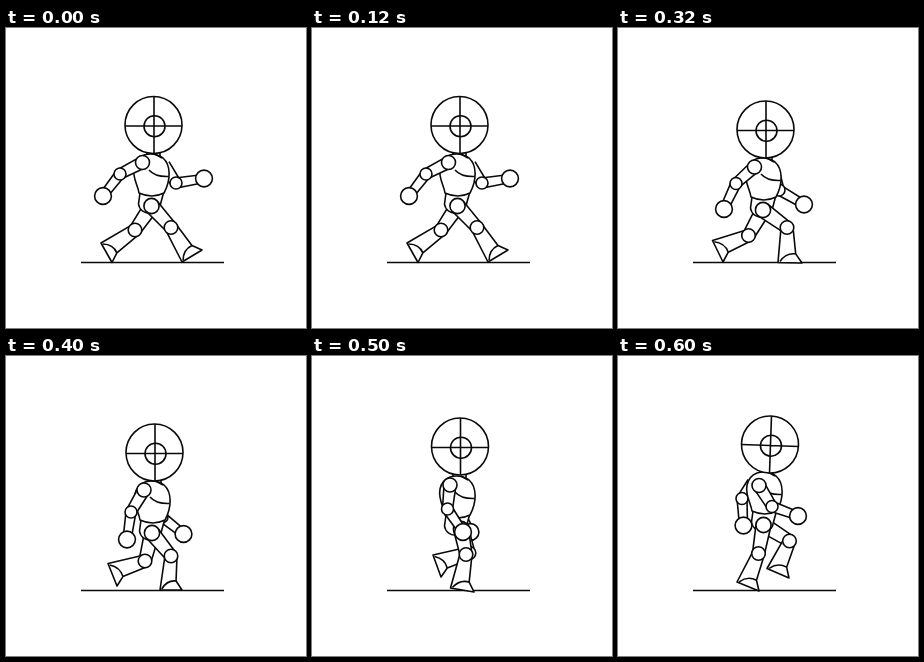
Write an HTML page with a canvas that moves like this. It is 300 px wide and 300 px high and loops after 700 ms.

```html
<!DOCTYPE html>
<html lang="en">
<head>
<meta charset="utf-8">
<title>Walk cycle</title>
<style>
html, body { margin: 0; width: 100%; height: 100%; overflow: hidden; background: #fff; }
canvas { display: block; width: 300px; height: 300px; }
</style>
</head>
<body>
<canvas id="stage" width="300" height="300"></canvas>
<script>
const canvas = document.getElementById('stage');
const ratio = window.devicePixelRatio || 1;
canvas.width = canvas.height = 300 * ratio;
const ctx = canvas.getContext('2d');
ctx.scale(ratio, ratio);

// Arms: shoulder, elbow, hand. Legs: knee, heel, toe. Body: torso offset.
const poses = [
  { until: 200, head: [147.5, 97], tilt: 0, body: [0, 0], hip: [145.5, 178],
    near: [[136.5, 134.5], [114, 146], [97, 168]], far: [[158, 137], [170, 155], [198, 150.5]],
    nearLeg: [[165, 199.5], [176, 234], [196, 222]], farLeg: [[129, 202], [95, 215], [106, 234.5]] },
  { until: 400, head: [147.5, 101.5], tilt: 0, body: [0, 4], hip: [145, 182],
    near: [[136.5, 139], [118, 155.5], [106, 181]], far: [[155, 142], [161, 162], [186, 176.5]],
    nearLeg: [[169, 199.5], [160, 234.5], [184, 235]], farLeg: [[130.5, 207.5], [94.5, 212.5], [105, 234]] },
  { until: 500, head: [148.5, 96.5], tilt: 0, body: [1, -1], hip: [146, 177],
    near: [[138, 134], [125, 156], [121, 183.5]], far: [[155, 138], [156, 161], [177.5, 178]],
    nearLeg: [[165, 200], [154, 234], [176, 234]], farLeg: [[139, 205], [102, 207.5], [111, 230]] },
  { until: 600, head: [148, 90.5], tilt: 0, body: [0, -6], hip: [149, 173],
    near: [[138, 129], [135.5, 153], [151, 176]], far: [[150, 134], [148, 158], [158.5, 176]],
    nearLeg: [[154, 198.5], [138.5, 232], [162, 236]], farLeg: [[157, 197], [121, 199], [129, 221]] },
  { until: 700, head: [152, 88.5], tilt: 0.035, body: [1, -10], hip: [145.5, 169],
    near: [[141, 129.5], [154, 150.5], [180, 160]], far: [[135, 127], [124, 142.5], [125.5, 169.5]],
    nearLeg: [[140.5, 197.5], [119, 226], [141, 235]], farLeg: [[171.5, 185], [149, 212.5], [171, 222]] }
];

function ink() {
  ctx.fill();
  ctx.stroke();
}

function disc([x, y], r) {
  ctx.beginPath();
  ctx.arc(x, y, r, 0, Math.PI * 2);
  ink();
}

function mix(a, b, t) {
  return [a[0] + (b[0] - a[0]) * t, a[1] + (b[1] - a[1]) * t];
}

// Offset of length w at right angles to the line from a to b
function side(a, b, w) {
  const dx = b[0] - a[0], dy = b[1] - a[1], d = Math.hypot(dx, dy);
  return [-dy / d * w, dx / d * w];
}

function bone(a, b, wa, wb) {
  const [ax, ay] = side(a, b, wa), [bx, by] = side(a, b, wb);
  ctx.beginPath();
  ctx.moveTo(a[0] + ax, a[1] + ay);
  ctx.lineTo(b[0] + bx, b[1] + by);
  ctx.lineTo(b[0] - bx, b[1] - by);
  ctx.lineTo(a[0] - ax, a[1] - ay);
  ink();
}

function arm([shoulder, elbow, hand], hasShoulder) {
  bone(shoulder, elbow, 6, 5);
  bone(elbow, hand, 5, 4);
  if (hasShoulder) disc(shoulder, 7);
  disc(elbow, 6);
  disc(hand, 8.4);
}

function leg(hip, [knee, heel, toe]) {
  // Point above the sole: t along it, h off it
  const above = (t, h) => {
    const p = mix(heel, toe, t), up = side(heel, toe, -h);
    return [p[0] + up[0], p[1] + up[1]];
  };
  const instep = above(0.73, 9);
  const [sx, sy] = side(knee, mix(heel, toe, 0.4), 6);

  bone(hip, knee, 7.5, 6);
  ctx.beginPath();
  ctx.moveTo(knee[0] + sx, knee[1] + sy);
  ctx.lineTo(...heel);
  ctx.lineTo(...toe);
  ctx.lineTo(...instep);
  ctx.lineTo(knee[0] - sx, knee[1] - sy);
  ink();
  ctx.beginPath();
  ctx.moveTo(...above(0.08, 1));
  ctx.quadraticCurveTo(...above(0.32, 10), ...instep);
  ctx.stroke();
  disc(knee, 6.8);
}

function pelvis([dx, dy]) {
  ctx.save();
  ctx.translate(dx, dy);
  ctx.beginPath();
  ctx.moveTo(134, 165);
  ctx.lineTo(132.5, 176);
  ctx.bezierCurveTo(134, 188, 153, 188, 154, 178);
  ctx.lineTo(157.5, 165);
  ink();
  ctx.restore();
}

function torso([dx, dy]) {
  ctx.save();
  ctx.translate(dx, dy);
  ctx.beginPath();
  ctx.rect(141, 120, 13, 9);
  ink();
  ctx.beginPath();
  ctx.moveTo(138, 127);
  ctx.quadraticCurveTo(148, 124, 157, 130);
  ctx.bezierCurveTo(165, 137, 165, 152, 158, 165);
  ctx.quadraticCurveTo(146, 171, 133, 165);
  ctx.bezierCurveTo(132, 157, 126, 150, 128, 139);
  ctx.quadraticCurveTo(130, 130, 138, 127);
  ink();
  ctx.beginPath();
  ctx.moveTo(143, 142);
  ctx.quadraticCurveTo(149, 149, 162.5, 148.5);
  ctx.moveTo(149, 126);
  ctx.lineTo(156, 130);
  ctx.stroke();
  ctx.restore();
}

function head([x, y], tilt) {
  ctx.save();
  ctx.translate(x, y);
  ctx.rotate(tilt);
  disc([0, 0], 28.5);
  disc([1, 1.2], 10.5);
  ctx.beginPath();
  ctx.moveTo(-28.5, 1);
  ctx.lineTo(28.5, 1);
  ctx.moveTo(0.5, -28.5);
  ctx.lineTo(0.5, 28.5);
  ctx.stroke();
  ctx.restore();
}

function draw(p) {
  ctx.fillStyle = '#fff';
  ctx.fillRect(0, 0, 300, 300);
  ctx.strokeStyle = '#0a0a0a';
  ctx.lineWidth = 1.6;
  ctx.lineJoin = 'round';
  ctx.beginPath();
  ctx.moveTo(75, 234.5);
  ctx.lineTo(218, 234.5);
  ctx.stroke();

  arm(p.far, false);
  leg(p.hip, p.farLeg);
  pelvis(p.body);
  leg(p.hip, p.nearLeg);
  torso(p.body);
  disc(p.hip, 7.6);
  head(p.head, p.tilt);
  arm(p.near, true);
}

const begin = performance.now();

function run() {
  const t = (performance.now() - begin) % 700;
  draw(poses.find(p => t < p.until));
  requestAnimationFrame(run);
}

run();
</script>
</body>
</html>
```
